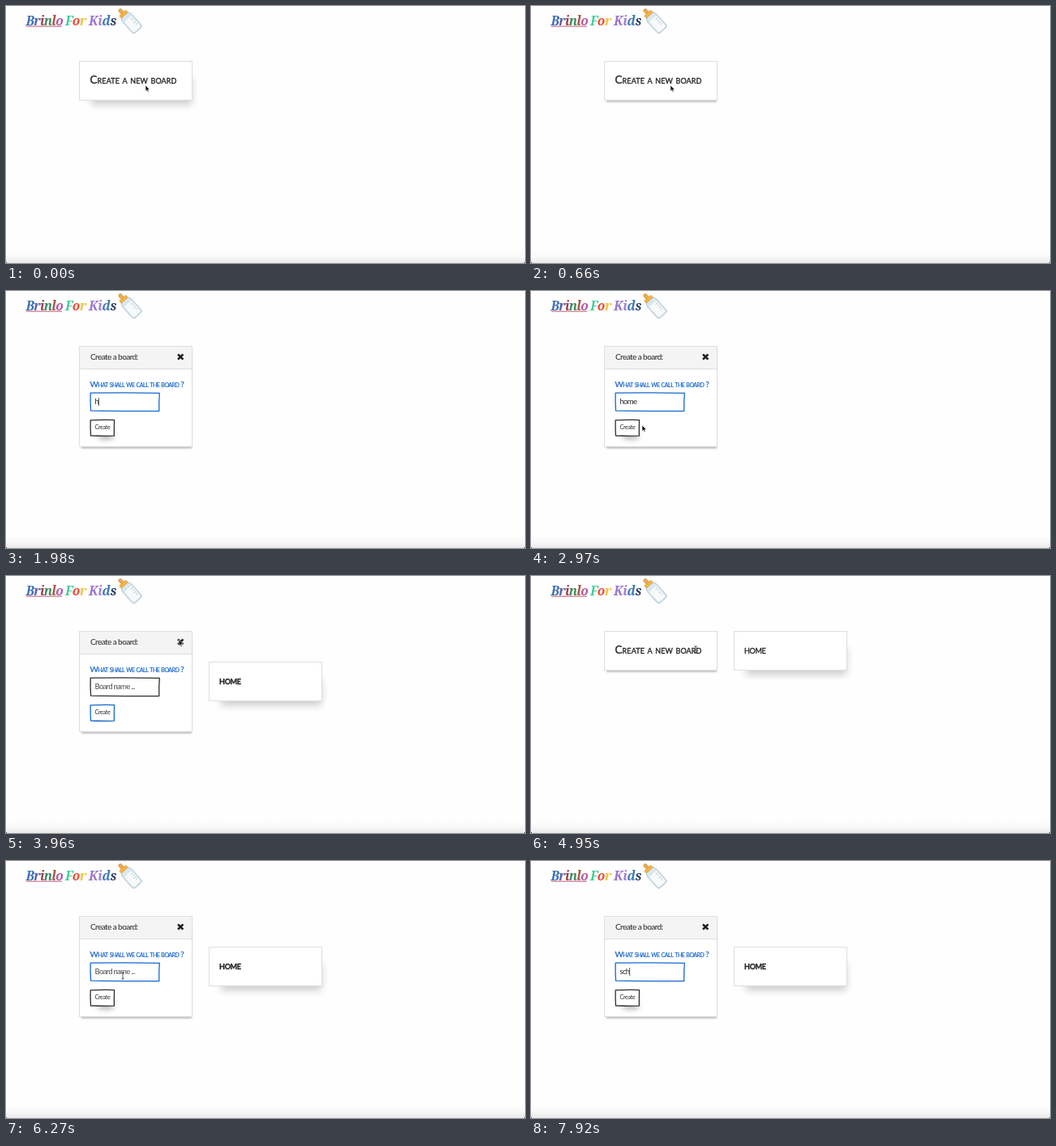
An HTML page that plays this animation: 640 by 318 pixels, repeating every 8 s.

```html
<!DOCTYPE html>
<html lang="en">
<head>
<meta charset="utf-8">
<title>Boards for kids</title>
<style>
html, body { margin: 0; width: 100%; height: 100%; overflow: hidden; background: #fefefe; }
#stage { position: absolute; left: 0; top: 0; width: 640px; height: 318px; overflow: hidden; }
#stage > *, #form > * { position: absolute; box-sizing: border-box; }
svg { left: 0; top: 0; width: 640px; height: 318px; overflow: visible; }
#floor { left: 0; top: 303px; width: 640px; height: 15px;
  background: linear-gradient(#fefefe00, #f8f8f8 50%, #e9e9e9); }
.corner { bottom: 0; width: 2px; height: 2px; }
.card { width: 140px; height: 49px; top: 68px; background: #fff; border: 1px solid #dedede; }
#first { left: 90px; }
#home { left: 250px; }
.large { box-shadow: 7px 13px 9px -8px rgba(0,0,0,.2); }
.medium { box-shadow: 4px 8px 6px -5px rgba(0,0,0,.24); }
.small { box-shadow: 1px 4px 2px -2px rgba(0,0,0,.24); }
.open { height: 125px; }
#header { left: 91px; top: 69px; width: 138px; height: 28px; background: #f4f4f4; border-bottom: 1px solid #dedede; }
#lift { left: 104px; top: 159px; width: 30px; height: 20px; box-shadow: 4px 10px 7px -6px rgba(0,0,0,.32); }
#lift.pressed { box-shadow: 1px 4px 2px -3px rgba(0,0,0,.35); }
.sketch { fill: #fff; stroke: #2c2d30; stroke-width: 1.3; stroke-linejoin: round; }
.focus { stroke: #1468ce; }
text { font-family: Lato, "Open Sans", sans-serif; fill: #26272a; white-space: pre; }
.brand { font: italic 600 15.5px "Noto Serif", serif; }
.caps { font-size: 13.5px; font-variant: small-caps; letter-spacing: .1px; stroke: #26272a; stroke-width: .35; }
.name { font-size: 12.2px; letter-spacing: -.3px; }
.question { font-size: 10px; font-variant: small-caps; letter-spacing: -.5px; fill: #1263cb; stroke: #1263cb; stroke-width: .2; }
.heading { font-size: 10.2px; letter-spacing: -.65px; }
.entry { font-size: 9.6px; letter-spacing: -.75px; }
.entry.hint { fill: #505156; }
.submit { font-size: 7.2px; letter-spacing: -.35px; }
[hidden] { display: none; }
</style>
</head>
<body>
<div id="stage">
  <div id="floor"></div>
  <div class="corner" style="left:0;background:radial-gradient(circle at 100% 0,#0000 1.6px,#222 2.2px)"></div>
  <div class="corner" style="right:0;background:radial-gradient(circle at 0 0,#0000 1.6px,#222 2.2px)"></div>

  <svg viewBox="0 0 640 318">
    <g id="brand"></g>
    <path d="M25 25.2H69" stroke="#c04a62" stroke-width=".9"/>
    <g transform="translate(139.5 4) rotate(-42)">
      <path d="M-1.8 7C-2 4.6-2.6 3.6-2.1 1.2Q0-1.4 2.1 1.2C2.6 3.6 2 4.6 1.8 7Z" fill="#eda94f" stroke="#c98135" stroke-width=".5"/>
      <path d="M-4.5 9.5H4.5Q7.4 11.5 7.4 15V31.5Q7.4 35 4.2 35H-4.2Q-7.4 35-7.4 31.5V15Q-7.4 11.5-4.5 9.5Z" fill="#d9e8ef" stroke="#a3b8c4" stroke-width=".8"/>
      <rect x="-5.5" y="6.2" width="11" height="4" rx="1.4" fill="#f3b540" stroke="#d18b2b" stroke-width=".5"/>
      <path d="M-5.7 16H5.7V31Q5.7 33.2 3.8 33.2H-3.8Q-5.7 33.2-5.7 31Z" fill="#f8faf9"/>
      <path d="M2 19H5M3 22H5M2 25H5M3 28H5" stroke="#8ba7b6" stroke-width=".7"/>
    </g>
  </svg>

  <div id="first" class="card"></div>
  <div id="home" class="card large"></div>

  <div id="form">
    <div id="header"></div>
    <div id="lift"></div>
  </div>

  <svg viewBox="0 0 640 318">
    <text id="prompt" class="caps" x="103.5" y="95.5">Create a new board</text>
    <text id="homeName" class="caps name" x="263">home</text>
    <g id="formText">
      <path id="field" class="sketch" d="M104.2 126.2Q150 125.4 189.3 126.3Q188.4 137 188.8 148.6Q140 148.8 104.6 148.2Q103.8 137 104.2 126.2Z"/>
      <path id="button" class="sketch" d="M104.2 159.8Q120 159.2 133.6 159.6Q133.2 170 133.4 179.2Q118 179.6 104.5 179Q103.9 169 104.2 159.8Z"/>
      <text class="heading" x="104" y="85">Create a board:</text>
      <path d="M212 78.3L218.4 84.7M218.4 78.3L212 84.7" stroke="#1d1d1f" stroke-width="2.5"/>
      <text class="question" x="103.5" y="119">What shall we call the board ?</text>
      <text id="entry" class="entry" x="109.5" y="139.5"></text>
      <path id="caret" d="M0 132V142" stroke="#333" stroke-width=".8"/>
      <text class="submit" x="109.5" y="171.2">Create</text>
    </g>
    <path id="arrow" d="M0 0V7.4L1.7 5.9L2.9 8.6L4.2 8L3 5.4H5.3Z" fill="#111" stroke="#fff" stroke-width=".6"/>
    <path id="beam" d="M-1.6-4.3Q0-4.3 0-3Q0-4.3 1.6-4.3M0-3V3M-1.6 4.3Q0 4.3 0 3Q0 4.3 1.6 4.3" fill="none" stroke="#222" stroke-width=".8"/>
  </svg>
</div>
<script>
const STEP = 330, LOOP = 8000, HINT = "Board name ...";
const el = id => document.getElementById(id);
const show = (id, on) => el(id).toggleAttribute("hidden", !on);

// Each word starts at x; each letter has its own colour.
const words = [
  [24.5, "Brinlo", "#3f70b8 #5a62a8 #a13c4c #3f8a62 #a8553e #b05aa8", -.75],
  [73, "For", "#43cd9d #ee4a35 #f2c53e", -.3],
  [102, "Kids", "#9a77cf #9f80d0 #3d79b5 #2d3f63", -.3]
];
el("brand").innerHTML = words.map(([x, word, colors, gap]) => {
  const fills = colors.split(" ");
  const letters = [...word].map((c, i) => `<tspan style="fill:${fills[i]}">${c}</tspan>`).join("");
  return `<text class="brand" x="${x}" y="23.5" style="letter-spacing:${gap}px">${letters}</text>`;
}).join("");

// Pointer per step: kind, x, y; null while typing hides it.
const pointer = [
  ["arrow", 172, 98], ["arrow", 172, 98], ["arrow", 172, 98], ["arrow", 172, 99], ["beam", 168, 134],
  ["beam", 152, 136], null, null, null, ["arrow", 137, 166],
  ["arrow", 126, 169], ["arrow", 206, 100], ["arrow", 213, 79], ["arrow", 213, 80], ["beam", 203, 92],
  ["beam", 203, 91], ["beam", 203, 91], ["arrow", 178, 113], ["beam", 147, 139], ["beam", 144, 142],
  null, null, null, null, null
];
const typed = { 6: "h", 7: "ho", 8: "home", 9: "home", 22: "s", 23: "sc", 24: "sch" };
const shadows = { 0: "large", 1: "medium", 3: "medium", 13: "medium", 16: "medium" };
const within = (n, from, to) => n >= from && n < to;

function draw(n) {
  const open = within(n, 3, 13) || n >= 16;
  const text = typed[n] || "";
  el("first").className = `card ${shadows[n] || "small"} ${open ? "open" : ""}`;
  show("form", open);
  show("formText", open);
  show("prompt", !open);

  const hasHome = n >= 10, homeShift = open ? 38 : 0;
  show("home", hasHome);
  show("homeName", hasHome);
  el("home").style.top = 68 + homeShift + "px";
  el("homeName").setAttribute("y", 95.5 + homeShift);
  el("homeName").style.fontWeight = open ? 700 : 400;

  const pressed = within(n, 10, 13);
  el("field").classList.toggle("focus", within(n, 5, 10) || n >= 18);
  el("button").classList.toggle("focus", pressed);
  el("lift").classList.toggle("pressed", pressed);
  el("entry").textContent = text || HINT;
  el("entry").classList.toggle("hint", !text);
  const caretOn = within(n, 6, 9) || n === 20 || n >= 22;
  show("caret", caretOn);
  if (caretOn) {
    const width = text ? el("entry").getComputedTextLength() : 0;
    el("caret").setAttribute("transform", `translate(${109.8 + width})`);
  }

  const [kind, x, y] = pointer[n] || [];
  for (const id of ["arrow", "beam"]) show(id, id === kind);
  if (kind) el(kind).setAttribute("transform", `translate(${x} ${y})`);
}

let last = -1;
function tick() {
  const n = Math.floor(performance.now() % LOOP / STEP);
  if (n !== last) draw(last = n);
  requestAnimationFrame(tick);
}
tick();
</script>
</body>
</html>
```
